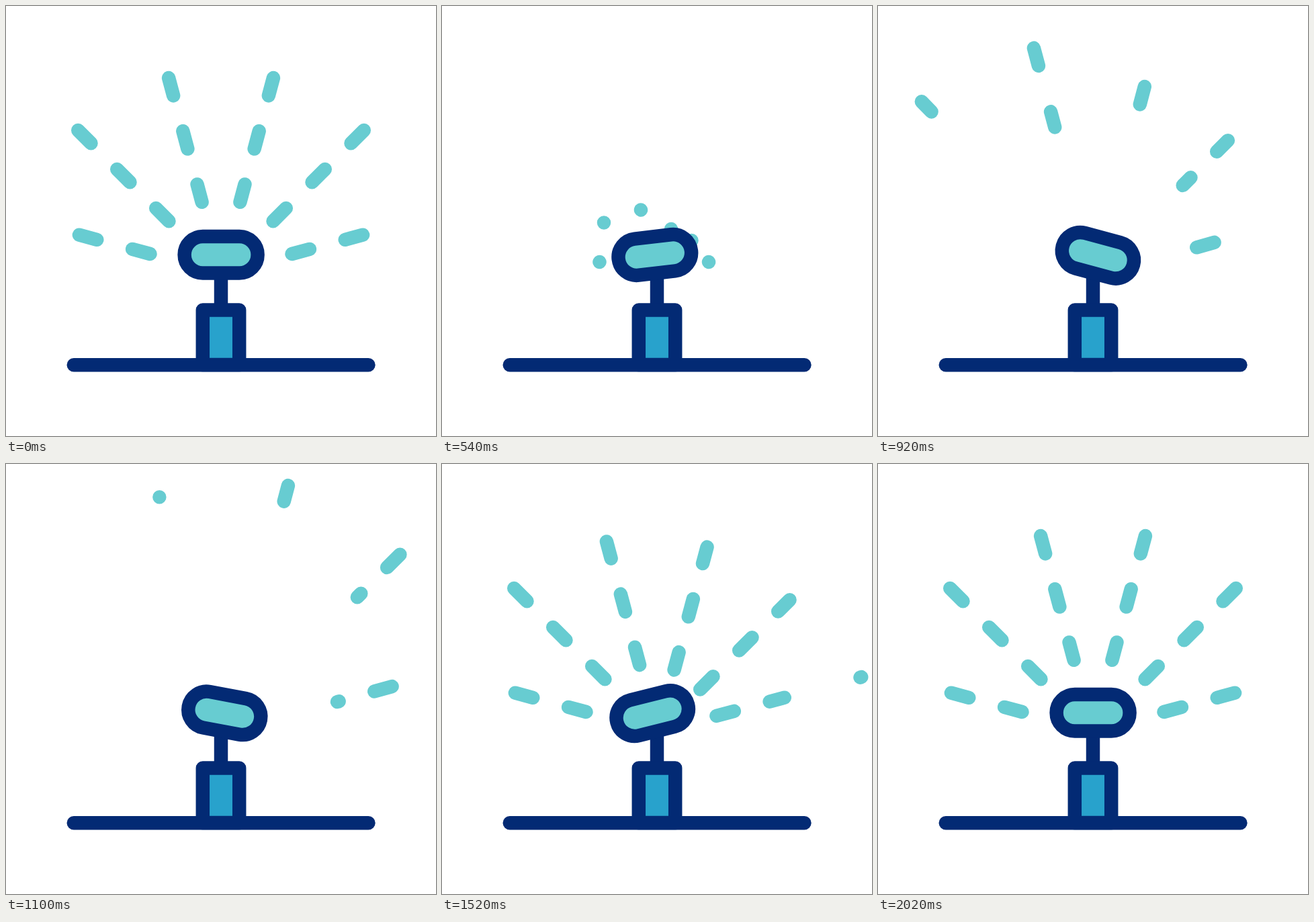
Write an HTML page that moves like this. It is 640 px wide and 640 px high and loops after 2.4 s.

```html
<!DOCTYPE html>
<html>
<head>
<meta charset="utf-8">
<style>
html, body { margin: 0; width: 100%; height: 100%; overflow: hidden; background: #fff; }
svg { display: block; width: 100vw; height: 100vh; }
</style>
</head>
<body>
<svg viewBox="0 0 640 640" fill="none" stroke="#032a74" stroke-width="20.48" stroke-linecap="round" stroke-linejoin="round">
  <path id="water" stroke="#67ccd1"/>
  <path d="M320 398V452"/>
  <path d="M292.8 534V452.4H347.2V534Z" fill="#28a2cc"/>
  <path d="M100.8 534.2H539.4"/>
  <rect id="head" x="265.6" y="343.1" width="109" height="54.4" rx="27.2" fill="#67ccd1"/>
</svg>
<script>
const LOOP = 2400, DASH = 27.3, PERIOD = 82;
const SECOND = 540, THIRD = 1180;
const water = document.getElementById('water');
const head = document.getElementById('head');

// One entry per ray, left to right.
// rest: inner point of the resting dashes, n: their count
// out: leaving spray [travel, peak front, last front, tail, end time, sideways drift]
// from, turn: start and angle change of the second spray
// flow: [dash speed, front speed, length, period], tail: [start, end, power]
// done: time at which the third spray settles
const rays = [
  { rest: [214.5, 369], n: 2, out: [80, 154, 100, 100, 220, 1.8], from: [234.5, 381], turn: 1,
    flow: [.57, .75, 178, 82], tail: [600, 820, 1], done: 1500 },
  { rest: [242.5, 320.2], n: 3, out: [84, 229, 111, 111, 250, 2], from: [241, 322.5], turn: .65,
    flow: [.84, 1, 252, 88.3], tail: [600, 981, 1], done: 1510 },
  { rest: [291.6, 291.8], n: 3, out: [79, 229, 106.6, 92, 260, 1.9], from: [296, 303.5], turn: .1,
    flow: [.842, .89, 263, 98], tail: [751, 1100, 1], done: 1705 },
  { rest: [348.4, 291.8], n: 3, out: [73, 229, 100, 74.5, 270, 1.5], from: [341, 332], turn: -.26,
    flow: [.505, .61, 323, 82], tail: [716, 1150, 1], done: 1764 },
  { rest: [397.5, 320.2], n: 3, out: [80, 229, 170, 80, 340, 1.8], from: [371.5, 349], turn: .1,
    flow: [.493, .555, 328, 82], tail: [706, 1311, 1], done: 1814 },
  { rest: [425.5, 369], n: 2, out: [54, 137, 137, 54, 400, 0], from: [397, 381], turn: -.7,
    flow: [.427, .42, 236, 82], tail: [600, 1525, 1.4], done: 1924 }
];
const swing = [[0, 0], [300, 15], [671, -15], [920, 15], [990, 15], [1430, -15], [2020, 0]];

const clamp = x => Math.min(1, Math.max(0, x));
const mix = (a, b, u) => a + (b - a) * u;
const sine = u => (1 - Math.cos(Math.PI * u)) / 2;

function key(t, keys, ease = u => u) {
  let i = 1;
  while (i < keys.length - 1 && t > keys[i][0]) i++;
  const [t0, a] = keys[i - 1], [t1, b] = keys[i];
  return mix(a, b, ease(clamp((t - t0) / (t1 - t0))));
}

// Dashes along a line, cut off at tail and front; a closed window leaves a dot.
function dashes([x, y], deg, tail, front, phase, period = PERIOD, side = 0) {
  const a = deg * Math.PI / 180, dx = Math.cos(a), dy = Math.sin(a);
  const at = s => (x + dx * s - dy * side).toFixed(2) + ' ' + (y + dy * s + dx * side).toFixed(2);
  const piece = (a, b) => `M${at(a)}L${at(b + .02)}`;
  if (front < tail) return '';
  if (front - tail < 4) return piece(tail, front);
  let d = '';
  for (let k = -9; k < 9; k++) {
    const s = phase + k * period;
    const a = Math.max(s, tail), b = Math.min(s + DASH, front);
    if (b > a) d += piece(a, b);
  }
  return d;
}

function spray(ray, i, t) {
  const deg = 195 + 30 * i, full = (ray.n - 1) * PERIOD + DASH;
  let d = '';

  const [travel, peak, last, tail, end, drift] = ray.out;
  if (t <= end) {
    const u = t / 240;
    d += dashes(ray.rest, deg,
      key(t, [[0, 0], [240, tail], [end > 240 ? end : 241, last]]),
      key(t, [[0, full], [80, peak], [240, last]]),
      travel * u, PERIOD, drift * u);
  }

  const [speed, rush, length, period] = ray.flow, [t0, t1, power] = ray.tail;
  if (t >= SECOND && t <= t1 + 15) {
    const age = t - SECOND;
    d += dashes(ray.from, deg + ray.turn,
      length * clamp((t - t0) / (t1 - t0)) ** power,
      Math.min(length, rush * age), speed * age, period);
  }

  if (t >= THIRD) {
    const a = deg * Math.PI / 180;
    const start = (ray.from[0] - ray.rest[0]) * Math.cos(a) + (ray.from[1] - ray.rest[1]) * Math.sin(a);
    const left = (1 - clamp((t - THIRD) / (ray.done - THIRD))) ** 3;
    const lag = (start - (ray.n - 1) * PERIOD) * left;
    const side = Math.min(4, -.07 * lag) * (i < 2 ? -1 : 1);
    d += dashes(ray.rest, deg, start, mix(full, start, left), lag, PERIOD, side);
  }
  return d;
}

function draw() {
  const t = Math.floor(performance.now() % LOOP / 20) * 20;
  water.setAttribute('d', rays.map((ray, i) => spray(ray, i, t)).join(''));
  head.setAttribute('transform', `rotate(${key(t, swing, sine).toFixed(2)} 320 398.5)`);
  requestAnimationFrame(draw);
}
draw();
</script>
</body>
</html>
```
